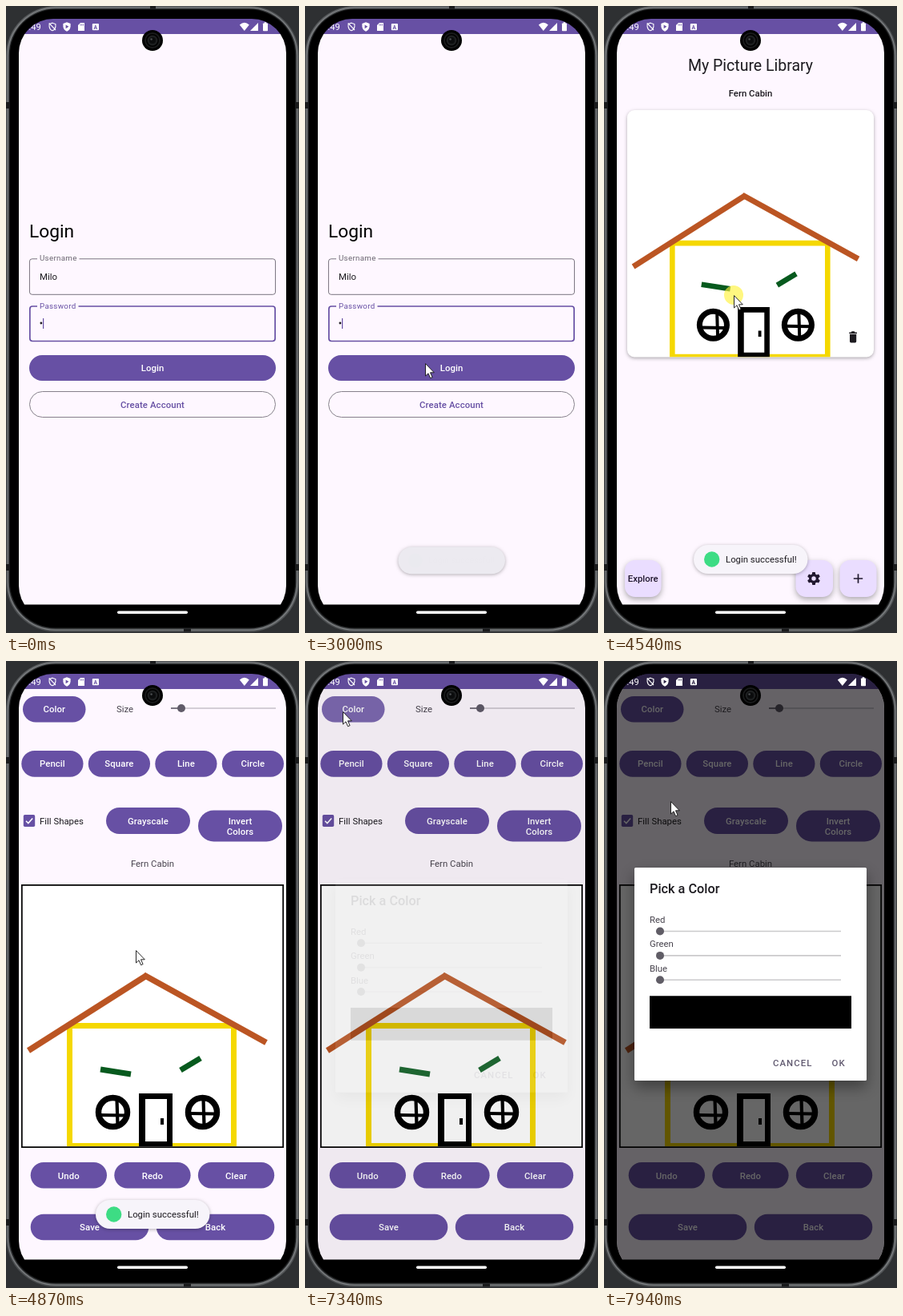
These frames come from a looping animation (366 px wide and 783 px high, 8 s). An HTML page with a canvas:

```html
<!DOCTYPE html>
<html lang="en">
<head>
<meta charset="utf-8">
<title>Picture library app</title>
<style>
html, body { margin: 0; width: 100%; height: 100%; overflow: hidden; background: #2e3032; }
canvas { display: block; width: 366px; height: 783px; }
</style>
</head>
<body>
<canvas id="stage"></canvas>
<script>
const W = 366, H = 783, LOOP = 8000;
const PURPLE = '#6750a4', BG = '#fef7ff', INK = '#1d1b20', GREY = '#49454f';
const TITLE = 'Fern Cabin', USER = 'Milo';
const dpr = window.devicePixelRatio || 1;

function setup(c) {
  c.width = W * dpr;
  c.height = H * dpr;
  const x = c.getContext('2d');
  x.scale(dpr, dpr);
  return x;
}
const stage = document.getElementById('stage');
const main = setup(stage);
const buffer = document.createElement('canvas');
const back = setup(buffer);
let g = main;

const clamp = v => Math.max(0, Math.min(1, v));
const ramp = (t, a, b) => clamp((t - a) / (b - a));
const smooth = p => p * p * (3 - 2 * p);

// Shape helpers
function path(pts, close) {
  g.beginPath();
  pts.forEach(([x, y], i) => i ? g.lineTo(x, y) : g.moveTo(x, y));
  if (close) g.closePath();
}
function fill(c) { g.fillStyle = c; g.fill(); }
function stroke(c, w) { g.strokeStyle = c; g.lineWidth = w; g.stroke(); }
function box(x, y, x2, y2, r) { g.beginPath(); g.roundRect(x, y, x2 - x, y2 - y, r); }
function rect(x, y, x2, y2, c, r = 0) { box(x, y, x2, y2, r); fill(c); }
function disc(x, y, r, c) { g.beginPath(); g.arc(x, y, r, 0, 7); fill(c); }
function line(x, y, x2, y2, c, w) { path([[x, y], [x2, y2]]); stroke(c, w); }
function text(s, x, y, { size = 11.38, weight = 400, color = INK, align = 'left', gap = 0 } = {}) {
  g.font = `${weight} ${size}px Roboto, sans-serif`;
  g.fillStyle = color;
  g.textAlign = align;
  g.letterSpacing = gap + 'px';
  g.fillText(s, x, y);
}
function shadow(blur, dy, alpha) {
  g.shadowBlur = blur * dpr;
  g.shadowOffsetY = dy * dpr;
  g.shadowColor = `rgba(0,0,0,${alpha})`;
}
function raised(x, y, x2, y2, c, r, blur = 5, dy = 2, alpha = 0.3) {
  g.save();
  shadow(blur, dy, alpha);
  rect(x, y, x2, y2, c, r);
  g.restore();
}
function layer(alpha, draw) {
  if (alpha <= 0) return;
  if (alpha >= 1) return draw();
  const front = g;
  g = back;
  g.clearRect(0, 0, W, H);
  draw();
  g = front;
  g.globalAlpha = alpha;
  g.drawImage(buffer, 0, 0, W, H);
  g.globalAlpha = 1;
}
function button(label, x, y, x2, y2, base) {
  rect(x, y, x2, y2, PURPLE, Math.min(20, (y2 - y) / 2));
  label.split('\n').forEach((s, i) =>
    text(s, (x + x2) / 2, base + i * 13.2, { weight: 500, color: '#fff', align: 'center', gap: 0.08 }));
}
function ripple(t, start, x, y, b, reach) {
  const a = 0.14 * (1 - ramp(t, start + 350, start + 780));
  if (t < start || a <= 0) return;
  g.save();
  box(...b, 16);
  g.clip();
  disc(x, y, 10 + reach * smooth(ramp(t, start, start + 300)), `rgba(255,255,255,${a})`);
  g.restore();
}

// The drawing, in units of the 326 px editor canvas
function house() {
  g.save();
  g.beginPath();
  g.rect(0, 0, 326, 326);
  g.clip();
  g.lineJoin = 'miter';
  box(59.5, 175.5, 264.5, 325.5, 0);
  stroke('#f5d800', 7);
  line(8, 206.5, 156, 112.5, '#bb5523', 7.5);
  line(152, 112, 305, 196.5, '#bb5523', 7.5);
  line(98, 230, 136, 236, '#075a1e', 7);
  line(198, 231, 223, 216, '#075a1e', 7);
  for (const [x, dx, dy] of [[113.5, 6, 4], [225.5, 2, 2]]) {
    g.beginPath();
    g.arc(x, 283.5, 18, 0, 7);
    stroke('#000', 7.5);
    line(x + dx - 1, 267, x + dx, 300, '#000', 4.2);
    line(x - 16, 283 + dy, x + 16, 283.5 + dy, '#000', 4.2);
  }
  rect(146, 260, 188, 326, '#000');
  rect(154, 267, 181, 320, '#fff');
  rect(173, 291, 177, 299, '#000');
  g.restore();
}
function placeHouse(x, y, size) {
  g.save();
  g.translate(x, y);
  g.scale(size / 326, size / 326);
  house();
  g.restore();
}

function field(label, y, y2, w, color, gapEnd) {
  box(29 + w / 2, y, 337 - w / 2, y2, 3.2);
  stroke(color, w);
  rect(39, y - 2, gapEnd, y + 2, BG);
  text(label, 42, y + 2.6, { size: 9.75, color, gap: 0.3 });
}

function loginPage(t) {
  rect(16, 35, 350, 748, BG);
  text('Login', 29, 289, { size: 22.75, color: '#000' });
  field('Username', 315.8, 360.3, 0.9, '#6b6671', 91.5);
  text(USER, 42, 342);
  field('Password', 375, 418.5, 1.7, PURPLE, 90.5);
  disc(43.9, 396, 1.4, INK);
  if (Math.abs(Math.floor((t - 330) / 493)) % 2) rect(46, 390, 47.2, 403, PURPLE);
  button('Login', 29, 436, 337, 468, 456);
  ripple(t, 1800, 150, 446, [29, 436, 337, 468], 200);
  box(29.5, 481.5, 336.5, 513.5, 16);
  stroke('#79747e', 0.9);
  text('Create Account', 183, 501.5, { weight: 500, color: PURPLE, align: 'center', gap: 0.08 });
}

function gear(x, y, c) {
  g.save();
  g.translate(x, y);
  for (let i = 0; i < 3; i++) {
    g.rotate(Math.PI / 3);
    rect(-2, -8, 2, 8, c, 0.8);
  }
  disc(0, 0, 6, c);
  disc(0, 0, 2.7, '#eaddff');
  g.restore();
}

function libraryPage() {
  const dark = '#21182f';
  rect(16, 35, 350, 748, BG);
  text('My Picture Library', 183, 81, { size: 19.5, align: 'center' });
  text(TITLE, 183, 112.5, { weight: 500, align: 'center' });
  raised(29, 130, 337, 438.5, '#fff', 9, 4, 1.5, 0.32);
  g.save();
  box(29, 130, 337, 438.5, 9);
  g.clip();
  placeHouse(29, 130, 308.5);
  g.restore();
  rect(306.3, 407.6, 315.9, 409.2, INK);
  rect(309, 406.3, 313.2, 408.5, INK, 0.8);
  rect(307, 410, 315.2, 420.4, INK, [0, 0, 1.6, 1.6]);
  for (const [x, x2] of [[26, 71.5], [239.5, 286], [294.5, 340.5]])
    raised(x, 692, x2, 738, '#eaddff', 13, 7, 3, 0.32);
  text('Explore', 48.7, 719, { weight: 500, color: dark, align: 'center' });
  gear(262, 715, dark);
  line(311.8, 715, 323.2, 715, dark, 1.7);
  line(317.5, 709.3, 317.5, 720.7, dark, 1.7);
}

function slider(x, x2, y, thumb, track, color) {
  line(x, y, x2, y, track, 1.6);
  line(x, y, thumb, y, color, 1.6);
  disc(thumb, y, 5, color);
}

function editorPage(t) {
  rect(16, 35, 350, 748, BG);
  button('Color', 21, 44, 99.5, 76.5, 64.3);
  ripple(t, 7080, 47, 63, [21, 44, 99.5, 76.5], 56);
  text('Size', 138, 64.3, { color: GREY });
  slider(206, 337, 59, 219, '#c6c0ca', '#605b69');
  ['Pencil', 'Square', 'Line', 'Circle'].forEach((s, i) =>
    button(s, 19.3 + i * 83.5, 112, 96.5 + i * 83.5, 144.7, 132.4));
  rect(21.8, 192, 36.2, 207, PURPLE, 1.8);
  path([[25, 199.8], [27.8, 202.6], [33.2, 196.6]]);
  stroke('#fff', 1.5);
  text('Fill Shapes', 42, 204);
  button('Grayscale', 125, 183, 230, 216, 203.6);
  button('Invert\nColors', 240, 186.5, 345, 225.5, 203.8);
  text(TITLE, 183, 257, { color: GREY, align: 'center' });
  rect(19, 279, 347, 608, '#000');
  rect(20.7, 280.7, 345.3, 606.2, '#fff');
  placeHouse(20, 280, 326);
  ['Undo', 'Redo', 'Clear'].forEach((s, i) =>
    button(s, 30.7 + i * 104.6, 626, 126 + i * 104.6, 658.5, 646.5));
  button('Save', 30.7, 690.7, 178.3, 723.3, 711);
  button('Back', 187.8, 690.7, 335.3, 723.3, 711);
}

function dialog() {
  raised(38, 258, 328, 524, '#fff', 1.6, 18, 8, 0.4);
  text('Pick a Color', 57, 290, { size: 16.25, weight: 500 });
  ['Red', 'Green', 'Blue'].forEach((s, i) => {
    const y = 327 + i * 30.4;
    text(s, 57, y, { color: GREY });
    slider(70, 296, y + 10.5, 70, '#cbcacc', '#605d66');
  });
  rect(57, 418.3, 309, 459, '#000');
  const flat = { weight: 500, color: '#625b71', gap: 1.05 };
  text('CANCEL', 211, 506, flat);
  text('OK', 284.5, 506, flat);
}

function toast(t) {
  if (t < 2990 || t > 5570) return;
  const p = ramp(t, 3000, 3130), s = 0.937 + 0.063 * smooth(p);
  layer(1 - ramp(t, 5400, 5570), () => {
    g.save();
    g.translate(183, 692.5 - 1.5 * p);
    g.scale(s, s);
    g.translate(-183, -691);
    const c = i => Math.round([236, 234, 240][i] + [11, 10, 10][i] * p);
    raised(112, 673, 254.5, 709, `rgb(${c(0)},${c(1)},${c(2)})`, 18, 4, 1, 0.3);
    g.globalAlpha = p;
    disc(134.7, 691, 9.7, '#3ddc84');
    text('Login successful!', 152, 695.2);
    g.restore();
  });
}

function shield(x, y, k) {
  g.beginPath();
  g.moveTo(x, y - 5 * k);
  g.lineTo(x + 4.2 * k, y - 3.5 * k);
  g.lineTo(x + 4.2 * k, y);
  g.quadraticCurveTo(x + 3.6 * k, y + 4 * k, x, y + 5.4 * k);
  g.quadraticCurveTo(x - 3.6 * k, y + 4 * k, x - 4.2 * k, y);
  g.lineTo(x - 4.2 * k, y - 3.5 * k);
  g.closePath();
}
function statusIcons(bar) {
  text(':49', 28.6, 30, { size: 11.2, color: '#fff' });
  shield(58, 25.8, 0.93);
  stroke('#fff', 1.1);
  line(53.8, 21.4, 62, 30, '#fff', 1.1);
  shield(76, 25.8, 1.1);
  fill('#fff');
  path([[74.6, 23.4], [78.4, 25.8], [74.6, 28.2]], true);
  fill(bar);
  path([[93, 21], [98, 21], [98, 31], [90, 31], [90, 24]], true);
  fill('#fff');
  for (const x of [93, 94.8, 96.4]) rect(x - 0.4, 22.4, x + 0.4, 24.6, bar);
  rect(107.8, 22, 116, 30.2, '#fff', 1);
  text('A', 111.9, 28.6, { size: 6.8, weight: 700, color: bar, align: 'center' });
  g.beginPath();
  g.moveTo(297.8, 31);
  g.lineTo(291.8, 23.5);
  g.quadraticCurveTo(297.8, 18, 303.8, 23.5);
  g.closePath();
  fill('#fff');
  path([[305, 31], [315, 31], [315, 21]], true);
  fill('#fff');
  rect(321, 21.4, 327, 31.2, '#fff', 0.8);
  rect(322.7, 20.2, 325.3, 22, '#fff');
}

function shell() {
  rect(0, 0, W, H, '#2e3032');
  const rim = g.createLinearGradient(0, 0, W, H);
  rim.addColorStop(0, '#5a5d5f');
  rim.addColorStop(0.5, '#3f4143');
  rim.addColorStop(1, '#55585a');
  rect(0, 0, W, 781.5, rim, 62);
  box(2.2, 2, 363.8, 779.3, 60);
  stroke('#808385', 1.1);
  rect(3.8, 3.5, 362.2, 777.5, '#171819', 58);
  rect(5, 4.6, 361, 776.3, '#000', 57);
  for (const y of [120, 697]) {
    rect(0, y, 4, y + 8, '#1a1b1c');
    rect(362, y, 366, y + 8, '#1a1b1c');
  }
  rect(180, 0, 187, 3.5, '#1a1b1c');
  rect(222, 777.5, 231, 781.5, '#1a1b1c');
}
function camera() {
  disc(183, 43, 13, '#000');
  g.beginPath();
  g.arc(183, 43, 9, 0, 7);
  stroke('#191a1b', 2);
  disc(183, 43, 6.5, '#1d1f20');
  disc(183, 43, 4, '#0b0c0d');
  disc(181.6, 41.5, 1.3, '#4b4e50');
}

// Pointer path: time, x, y
const moves = [
  [730, 349, 612], [1000, 284, 577], [1210, 203, 508], [1390, 149, 457], [1530, 150, 446],
  [2670, 150, 446], [2800, 150, 446], [3350, 150, 446], [3800, 162, 385],
  [3870, 162, 382], [4070, 162, 361], [5340, 162, 361], [5480, 135, 318], [5620, 90, 234],
  [5740, 60, 171], [5920, 46, 110], [6140, 39, 73], [6270, 41, 72], [6340, 43, 71],
  [6480, 45, 67], [6540, 47, 63], [7800, 47, 63], [7880, 57, 98], [7940, 83, 175], [8000, 83, 175]
];
function pointer(t) {
  if (t < moves[0][0]) return;
  let i = 0;
  while (i < moves.length - 2 && t >= moves[i + 1][0]) i++;
  const [a, x, y] = moves[i], [b, x2, y2] = moves[i + 1];
  const p = ramp(t, a, b);
  g.save();
  g.translate(x + (x2 - x) * p, y + (y2 - y) * p);
  if ([1800, 4540, 7080].some(c => t >= c && t < c + 130)) disc(0, 0, 12, 'rgba(255,243,60,0.65)');
  path([[0.5, 0.6], [0.5, 16], [4, 12.8], [6.6, 18.7], [9.1, 17.6], [6.5, 11.8], [11.3, 11.8]], true);
  fill('#fff');
  stroke('#111', 0.9);
  g.restore();
}

function draw(t) {
  shell();
  g.save();
  box(16, 16, 350, 767, 43);
  g.clip();
  rect(16, 16, 350, 35.5, PURPLE);
  const toLibrary = ramp(t, 3130, 3340), toEditor = ramp(t, 4640, 4860);
  if (toLibrary < 1) loginPage(t);
  if (toEditor < 1) layer(toLibrary, libraryPage);
  layer(toEditor, () => editorPage(t));
  toast(t);
  const open = ramp(t, 7320, 7540);
  rect(16, 16, 350, 748, `rgba(0,0,0,${0.6 * open})`);
  layer(open, () => {
    g.save();
    g.translate(0, 18 * (1 - open) ** 2);
    dialog();
    g.restore();
  });
  rect(16, 747.5, 350, 768, '#000');
  statusIcons(open > 0.5 ? '#2a2042' : PURPLE);
  g.restore();
  rect(139, 755.4, 227, 758.9, '#fff', 1.7);
  camera();
  pointer(t);
}

function frame() {
  draw(performance.now() % LOOP);
  requestAnimationFrame(frame);
}
frame();
</script>
</body>
</html>
```
